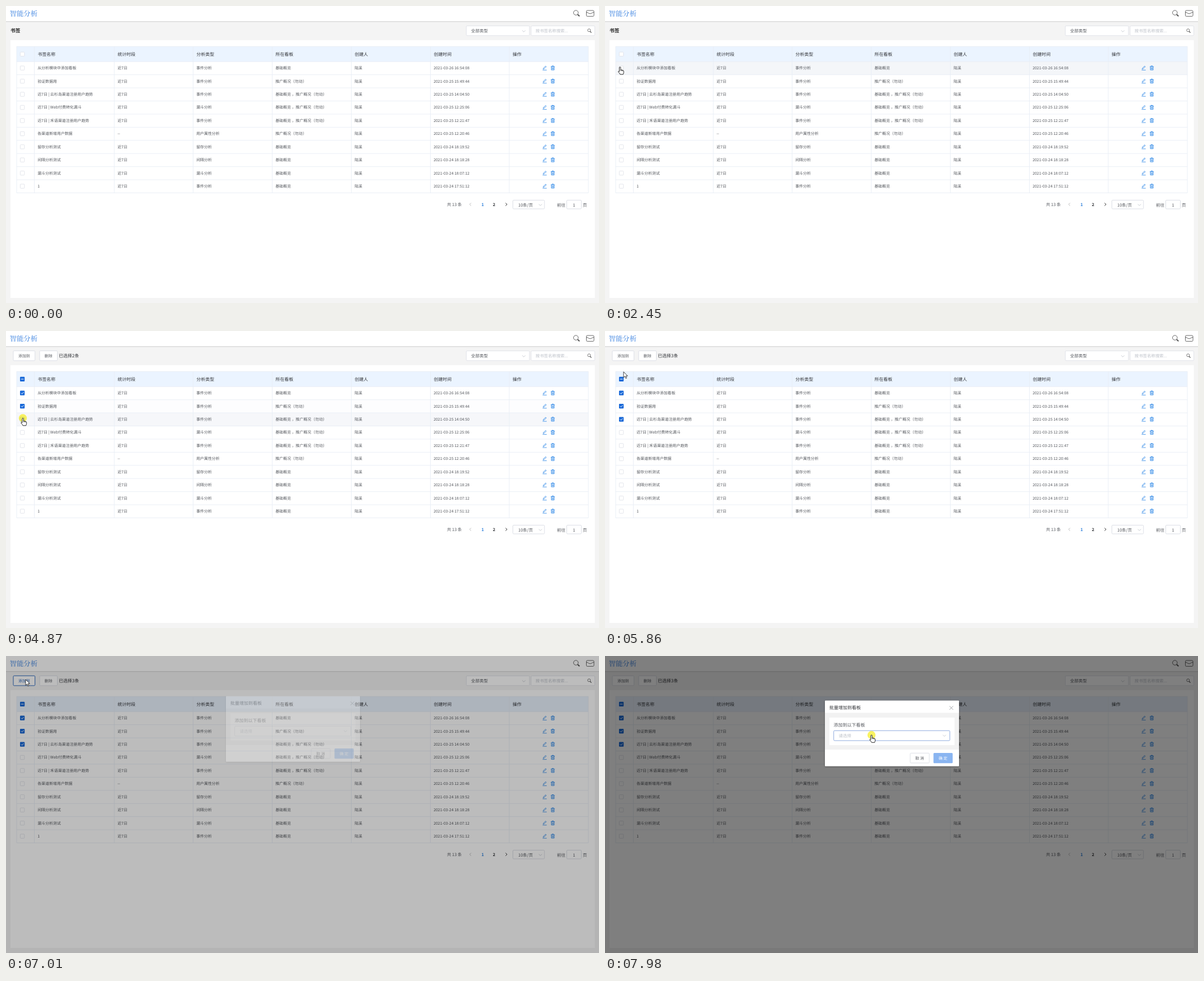
An HTML page that plays this animation: 1057 by 530 pixels, repeating every 8000 ms.

```html
<!DOCTYPE html>
<html>
<head>
<meta charset="utf-8">
<title>智能分析</title>
<style>
html, body { margin: 0; width: 100%; height: 100%; overflow: hidden; background: #f4f4f4; }
svg { display: block; width: 1057px; height: 530px; }
text { font-family: "Noto Sans CJK SC", "Noto Sans CJK", "Noto Sans", sans-serif; white-space: pre; text-rendering: geometricPrecision; }
.brand { font-family: "Noto Serif CJK SC", "Noto Serif CJK", "Noto Serif", serif; font-weight: 700; }
.bold { font-weight: 700; }
#dialog { filter: drop-shadow(0 1px 1.5px rgba(0,0,0,.3)); }
</style>
</head>
<body>
<svg id="stage" viewBox="0 0 1057 530" xmlns="http://www.w3.org/2000/svg"></svg>
<script>
const LOOP = 8000;
const BLUE = '#1768d8', LINE = '#e8eef5', EDGE = '#dcdfe6', INK = '#55585e', DARK = '#303236', HINT = '#bcc0c8';
const CREATOR = '陆溪';
const COLS = [50.5, 193, 333.5, 474.5, 615.5, 756.5, 897];
const HEADS = ['书签名称', '统计时段', '分析类型', '所在看板', '创建人', '创建时间', '操作'];
const BASE = '基础概览', PROMO = '推广概况（勿动）', BOTH = BASE + ' ，' + PROMO;
const ROWS = [
  ['从分析模块中添加看板', '近7日', '事件分析', BASE, '26 16:54:08'],
  ['验证数据用', '近7日', '事件分析', PROMO, '25 15:49:44'],
  ['近7日 | 云杉岛渠道注册用户趋势', '近7日', '事件分析', BOTH, '25 14:04:50'],
  ['近7日 | Web付费转化漏斗', '近7日', '漏斗分析', BOTH, '25 12:25:06'],
  ['近7日 | 禾语渠道注册用户趋势', '近7日', '事件分析', BOTH, '25 12:21:47'],
  ['各渠道新增用户数据', '--', '用户属性分析', PROMO, '25 12:20:46'],
  ['留存分析测试', '近7日', '留存分析', BASE, '24 18:19:52'],
  ['间隔分析测试', '近7日', '间隔分析', BASE, '24 18:18:28'],
  ['漏斗分析测试', '近7日', '漏斗分析', BASE, '24 18:07:12'],
  ['1', '近7日', '事件分析', BASE, '24 17:51:12']
];
const TOP = 99.2, ROW_H = 23.43;
const midY = i => TOP + ROW_H * (i + .5) - .3;

// y is the vertical centre of the glyphs
const text = (x, y, s, size = 6.93, fill = INK, extra = '') =>
  `<text x="${x}" y="${(y + size * .37).toFixed(2)}" font-size="${size}" fill="${fill}" ${extra}>${s}</text>`;
const box = (x, y, w, h, fill = '#fff', stroke = EDGE, extra = '') =>
  `<rect x="${x}" y="${y}" width="${w}" height="${h}" fill="${fill}" stroke="${stroke}" ${extra}/>`;
const path = (d, stroke, width = 1, fill = 'none') =>
  `<path d="${d}" stroke="${stroke}" stroke-width="${width}" fill="${fill}"/>`;
const chevron = (x, y) => path(`M${x - 2.8} ${y - 1.3}l2.8 2.8l2.8 -2.8`, HINT, .8);
const group = (id, inner, extra = '') => `<g id="${id}" ${extra}>${inner}</g>`;

const check = (id, y, mark) =>
  box(25.4, y - 3.6, 7.4, 7.4, '#fff', EDGE, `rx="1" stroke-width=".8" id="${id}Box"`) +
  group(id, box(25, y - 4, 8.2, 8.2, BLUE, 'none', 'rx="1"') + path(mark, '#fff', 1));

function header() {
  return box(0, 0, 1057, 27, '#fff', 'none') +
    box(0, 27, 1057, 1, '#d9d9d9', 'none') + box(0, 28, 1057, 1.2, '#eaeaea', 'none') +
    text(6.5, 13, '智能分析', 12.4, '#78a9ea', 'class="brand"') +
    `<circle cx="1015.8" cy="12" r="4.2" fill="none" stroke="#666"/>` + path('M1018.8 15l3.5 3.3', '#555', 1.9) +
    box(1034.5, 8, 13.5, 10.4, 'none', '#666', 'rx="1.8"') +
    path('M1034.5 11.3q3 .2 4.2 1.7q2.5 1.6 5 0q1.2 -1.5 4.3 -1.7', '#666');
}

function toolbar() {
  return group('title', text(8, 43.5, '书签', 8.8, '#222', 'class="bold"')) +
    group('tools',
      box(13, 35.3, 38.7, 17.6, '#fff', EDGE, 'rx="1.5" id="addBox"') +
      text(22, 44.2, '添加到', 6.93, INK, 'id="addText"') +
      box(60, 35.3, 31.5, 17.6, '#fff', EDGE, 'rx="1.5"') + text(68.8, 44.2, '删除') +
      text(94, 44, '', 7.95, DARK, 'id="count"')) +
    box(820.5, 35.5, 112.5, 17.3, '#fff', EDGE, 'rx="1.5" stroke-width=".8"') +
    text(829, 44.2, '全部类型', 7.5) + chevron(923, 44.8) +
    box(936, 35.5, 113.5, 17.3, '#fff', EDGE, 'rx="1.5" stroke-width=".8"') +
    text(944, 44.2, '按书签名称搜索...', 7.4, HINT) +
    `<circle cx="1039.3" cy="43.3" r="2.5" fill="none" stroke="#555" stroke-width=".8"/>` + path('M1041 45.2l2.5 2.4', '#555', 1.3);
}

function table() {
  let s = box(19, 72, 1019, 27.3, '#ebf4ff', 'none');
  ROWS.forEach((r, i) => {
    s += box(19, TOP + ROW_H * i, 1019, ROW_H, '#f4f6f9', 'none', `id="hover${i}" opacity="0"`);
  });
  for (let i = 0; i <= ROWS.length; i++) s += path(`M19 ${TOP + ROW_H * i}H1038`, LINE, .9);
  s += path('M19 72.3H1038', LINE, .9);
  [19, ...COLS, 1038].forEach(x => s += path(`M${x} 72V333.5`, LINE, .9));
  HEADS.forEach((h, i) => s += text(COLS[i] + 6, 86, h, 7.9, DARK));
  s += check('all', 85.8, 'M26.7 85.9h4.8');
  ROWS.forEach((r, i) => {
    const y = midY(i);
    [r[0], r[1], r[2], r[3], CREATOR, '2021-03-' + r[4]].forEach((v, c) =>
      s += text(COLS[c] + 5.7, y, v));
    s += check('row' + i, y, `M26.9 ${y}l1.7 1.8l3 -3.4`);
    s += path(`M956.5 ${y + 3.7}h7.3M957.4 ${y + 2}l.5 -1.7l4 -3.8l1.2 1.2l-4 3.8z`, '#3b8fe8', .9);
    s += path(`M971 ${y - 2.4}h7.2M973.2 ${y - 2.6}v-1.1h2.8v1.1M972.1 ${y - 2}v5.5h5v-5.5M973.8 ${y - 1}v3.4M975.4 ${y - 1}v3.4`, '#3b8fe8', 1);
  });
  return s;
}

function pager() {
  const y = 354;
  return text(786, y, '共 13 条', 7.4) + path(`M829 ${y - 2.6}l-2.6 2.6l2.6 2.6`, '#aaa', .8) +
    text(847.5, y, '1', 7.4, '#2f80dc', 'class="bold"') + text(867.7, y, '2', 7.4, DARK, 'class="bold"') +
    path(`M890.5 ${y - 2.6}l2.6 2.6l-2.6 2.6`, '#333', 1) +
    box(903.5, 346.5, 56.3, 15.5, '#fff', EDGE, 'rx="1.5"') + text(913, y + .8, '10条/页', 7.5) + chevron(952.5, y + .8) +
    text(982, y + .8, '前往', 7.6) + box(999.5, 346.5, 26, 15.5, '#fff', EDGE, 'rx="1.5"') +
    text(1010.4, y + .8, '1', 7.5) + text(1028, y + .8, '页', 7.6);
}

function dialog() {
  return box(392, 79.5, 239, 117.3, '#fff', 'none', 'rx="1"') +
    box(392, 101.5, 239, 65.5, '#f2f2f2', 'none') +
    box(400, 110, 223, 49, '#fff', 'none') +
    text(400, 91.8, '批量增加到看板', 8, DARK) + path('M614 89.3l6.6 6.6m0 -6.6l-6.6 6.6', '#8b8e94', .8) +
    text(407.5, 122.7, '添加到以下看板', 8) +
    box(407.7, 133.2, 207, 17.8, '#fff', EDGE, 'rx="1.5" id="field"') +
    text(416.5, 142.2, '请选择', 7.5, HINT) + chevron(605, 142) +
    box(544, 173.3, 34, 17.6, '#fff', EDGE, 'rx="1.5"') + text(553, 182.2, '取 消', 7) +
    box(585.5, 173, 34.2, 18.2, '#8ab5f1', 'none', 'rx="1.5"') + text(594.7, 182.2, '确 定', 7, '#fff');
}

function pointer() {
  const arrow = path('M0 0V10.2L2.4 8L4 11.8L5.7 11L4.1 7.4H7.3Z', '#111', .8, '#fff');
  const hand = path('M-1.2 1.2a1.2 1.2 0 0 1 2.4 0V5l3.6 .8q1.8 .5 1.8 2.1v2q0 1.2 -1.1 3.4h-5.2q-.9 -1.9 -3.6 -4.8q.3 -1.7 2.1 -.2z', '#111', .9, '#fff') +
    path('M1.2 5v2.2M3 5.5v1.9M4.8 6v1.6', '#111', .7);
  return group('pointer',
    '<circle id="press" r="7.2" fill="#f7ee2e" opacity=".75"/>' + group('arrow', arrow) + group('hand', hand));
}

const stage = document.getElementById('stage');
stage.innerHTML = box(0, 0, 1057, 530, '#f4f4f4', 'none') + box(8, 61, 1041.5, 460, '#fff', 'none') +
  header() + toolbar() + table() + pager() +
  box(0, 0, 1057, 530, '#000', 'none', 'id="mask"') + group('dialog', dialog()) + pointer();
const $ = id => document.getElementById(id);
const show = (id, on) => $(id).style.display = on ? '' : 'none';

// pointer stops: time, x, y
const PATH = [
  [140, 1020, 527], [350, 885, 465], [630, 885, 465], [1210, 194, 352], [1470, 194, 352],
  [2100, 18, 112], [2230, 25, 107.5], [2280, 25, 107.5], [2620, 28.5, 110], [3240, 28.5, 110],
  [3970, 29.5, 138.6], [4560, 29.5, 138.6], [4800, 30, 155.5], [5200, 30, 155.5],
  [6160, 34, 48], [6460, 35, 42], [7460, 35, 42], [7770, 478, 171], [7920, 475, 141], [LOOP, 475, 141]
];
const PRESSES = [[2860, 3040], [4050, 4230], [4840, 5050], [6640, 6820], [7940, LOOP]];
const CHECKED = [3040, 4230, 5050];
const MODAL = 6880, OPEN = 6950;

function pointerAt(t) {
  const i = Math.max(1, PATH.findIndex(p => p[0] > t));
  const [t0, x0, y0] = PATH[i - 1], [t1, x1, y1] = PATH[i];
  const u = Math.min(1, Math.max(0, (t - t0) / (t1 - t0))), k = u * u * (3 - 2 * u);
  return [x0 + (x1 - x0) * k, y0 + (y1 - y0) * k];
}
const inside = (x, y, l, top, r, b) => x > l && x < r && y > top && y < b;
const rowAt = (t, x, y) => t < MODAL && inside(x, y, 19, TOP, 1038, TOP + ROW_H * ROWS.length)
  ? Math.floor((y - TOP) / ROW_H) : -1;

function isHand(t, x, y) {
  if (t >= MODAL) return inside(x, y, 407, 133, 615, 151);
  const r = rowAt(t, x, y);
  if (r >= 0) return x > 23.5 && x < 34 && Math.abs(y - midY(r)) < 6;
  return t > 3040 && inside(x, y, 13, 35, 52, 53);
}

// row highlight levels, one sample per 10 ms
const STEP = 10, FADE = 250;
const levels = [];
for (let t = 0, now = ROWS.map(() => 0); t <= LOOP; t += STEP) {
  const r = t < 140 ? -1 : rowAt(t, ...pointerAt(t));
  now = now.map((v, i) => Math.min(1, Math.max(0, v + (i === r ? 1 : -1) * STEP / FADE)));
  levels.push(now);
}

const fades = [
  $('mask').animate({ opacity: [0, .5] }, { delay: OPEN, duration: 200, easing: 'ease', fill: 'both' }),
  $('dialog').animate(
    [{ opacity: 0, transform: 'translateY(-11.5px)' }, { opacity: 1, transform: 'translateY(0px)' }],
    { delay: OPEN, duration: 300, easing: 'ease', fill: 'both' })
];
fades.forEach(a => a.pause());

function draw(t) {
  const [x, y] = pointerAt(t), hand = isHand(t, x, y);
  const pressed = PRESSES.some(([a, b]) => t >= a && t < b);
  show('pointer', t >= 140);
  $('pointer').setAttribute('transform', `translate(${x.toFixed(2)} ${y.toFixed(2)})`);
  show('hand', hand);
  show('arrow', !hand);
  show('press', pressed);

  const row = rowAt(t, x, y), now = levels[Math.floor(t / STEP)];
  ROWS.forEach((r, i) => {
    $('hover' + i).setAttribute('opacity', now[i].toFixed(2));
    show('row' + i, t >= CHECKED[i]);
    $(`row${i}Box`).setAttribute('stroke', pressed && row === i ? BLUE : EDGE);
  });

  const count = CHECKED.filter(c => t >= c).length;
  show('all', count);
  show('tools', count);
  show('title', !count);
  $('count').textContent = `已选择${count}条`;

  const active = t < 7940 && (t > 6640 || (count && inside(x, y, 13, 35, 52, 53)));
  $('addBox').setAttribute('stroke', active ? '#2d69bd' : EDGE);
  $('addText').setAttribute('fill', active ? '#2d69bd' : INK);
  $('field').setAttribute('stroke', t >= 7940 ? '#8eaade' : EDGE);
  fades.forEach(a => a.currentTime = t);
}

const start = performance.now();
function tick() {
  draw((performance.now() - start) % LOOP);
  requestAnimationFrame(tick);
}
tick();
</script>
</body>
</html>
```
